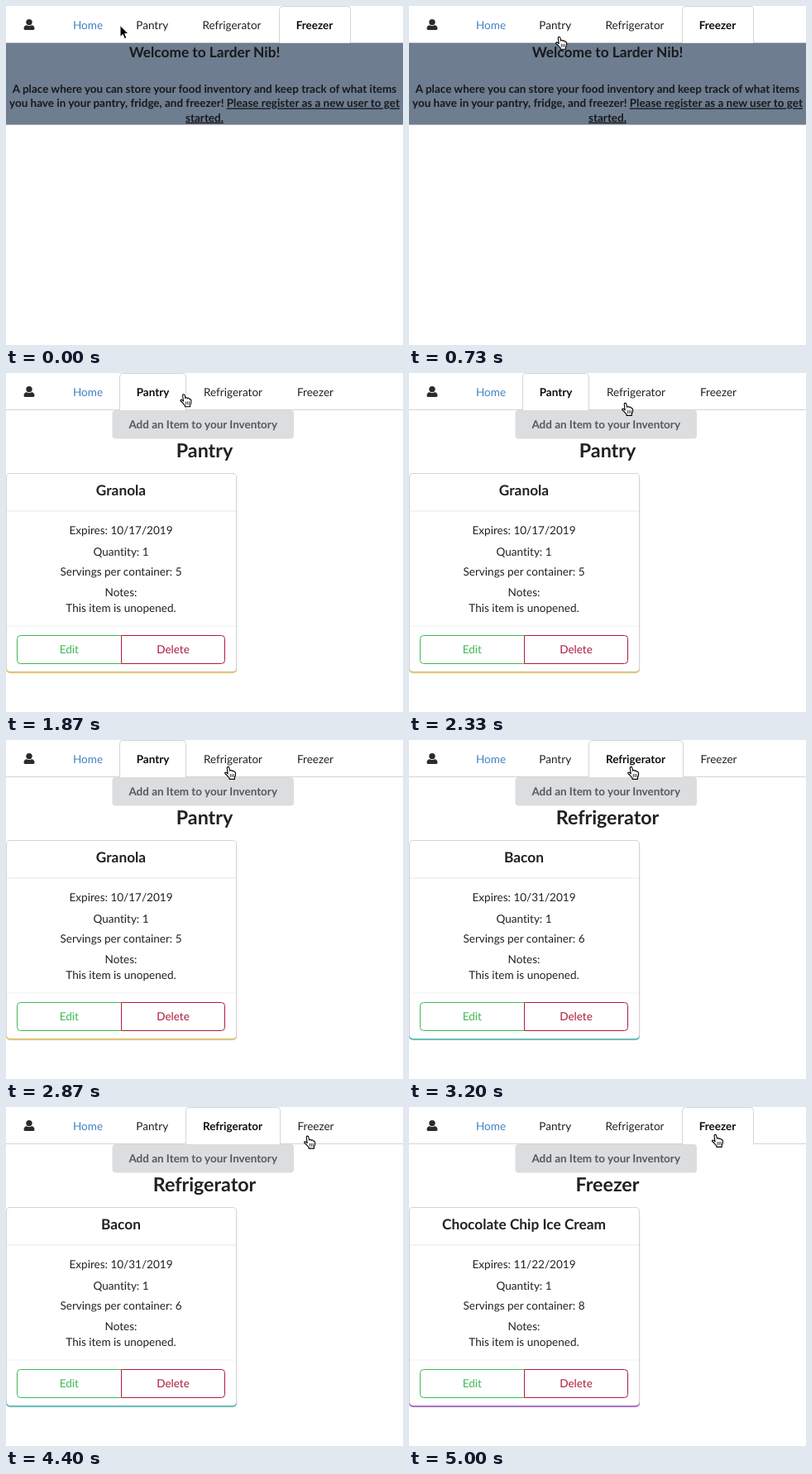
An HTML page for the animation above (5390 ms loop, 480 by 410 pixels).

```html
<!DOCTYPE html>
<html lang="en">
<head>
<meta charset="utf-8">
<title>Food inventory</title>
<style>
  html, body { margin: 0; width: 100%; height: 100%; overflow: hidden; background: #fff; }
  svg { display: block; }
  text {
    font: 13.55px Lato, sans-serif; fill: #212121; text-anchor: middle;
    text-rendering: geometricPrecision; font-variant-ligatures: none;
  }
  .bold { font-size: 13.47px; font-weight: 700; }
  .title { font-size: 17.3px; font-weight: 700; }
  .heading { font-size: 23.25px; font-weight: 700; }
  .link { text-decoration: underline; }
  .home { fill: #4183c4; }
  .active { fill: #0d0d0d; }
  .intro text { fill: #17191b; }
  .add { fill: #58595a; }
  .edit { fill: #3dbb52; }
  .delete { fill: #ae1a3c; }
</style>
</head>
<body>
<svg id="stage" width="480" height="410" viewBox="0 0 480 410">
  <g id="page"></g>
  <path id="arrow" d="M0 0V13.9L3.2 11L5.4 16.1L7.9 15L5.7 10H10Z"
        fill="#000" stroke="#fff" stroke-width="1" stroke-linejoin="round"/>
  <g id="hand" stroke="#000" stroke-linejoin="round" stroke-linecap="round">
    <path transform="translate(-4.6 -.8)" fill="#fff" stroke-width="1.1"
          d="M4.1 9L3.2 2.2Q3 .6 4.3 .5Q5.5 .4 5.8 2L6.6 5.4Q7 4.4 8 4.6Q9 4.7 9.1 5.8
             Q9.6 5 10.5 5.3Q11.4 5.6 11.5 6.6Q12.4 6.2 13 7Q13.7 7.8 13.5 10Q13.4 12 12.3 13.3
             V15.5H6V14Q4.6 12.6 3.4 11.2Q2 9.6 .9 8.8Q.2 8 1 7.3Q1.9 6.8 2.9 7.7Z"/>
    <path transform="translate(-4.6 -.8)" fill="none" stroke-width=".8"
          d="M7.2 9.6V12.6M9.2 9.6V12.6M11.2 9.6V12.6"/>
  </g>
</svg>
<script>
const LOOP = 5390;
const STEP = 1000 / 15;
const GREY = '#d4d4d5';
const byId = id => document.getElementById(id);

const text = (x, y, str, cls = '') => `<text x="${x}" y="${y}" class="${cls}">${str}</text>`;
const rect = (x, y, w, h, fill, r = 0) =>
  `<rect x="${x}" y="${y}" width="${w}" height="${h}" rx="${r}" fill="${fill}"/>`;
const path = (d, stroke, fill = 'none') => `<path d="${d}" stroke="${stroke}" fill="${fill}"/>`;

const tabs = [
  { label: 'Pantry', left: 137.5, right: 217.5 },
  { label: 'Refrigerator', left: 217.5, right: 331.5 },
  { label: 'Freezer', left: 330.5, right: 416.5 }
];

function nav(active, centers) {
  const { left, right } = tabs[active];
  const icon = `<g fill="#2a2b2c"><circle cx="28" cy="19.6" r="3.7"/>
    <path d="M21.5 27.6Q21.5 23.4 25.2 23.2Q28 24.9 30.8 23.2Q34.5 23.4 34.5 27.6Q34.5 29 33 29H23Q21.5 29 21.5 27.6Z"/></g>`;
  return path('M0 44.5H480', GREY) +
    path(`M${left} 45V4.5Q${left} .5 ${left + 4} .5H${right - 4}Q${right} .5 ${right} 4.5V45`, GREY, '#fff') +
    icon + text(99, 27.6, 'Home', 'home') +
    tabs.map((t, i) => text(centers[i], 27.6, t.label, i === active ? 'bold active' : '')).join('');
}

function welcome() {
  return `<g class="intro">` + rect(0, 44.8, 480, 98.8, '#6e7d90') +
    text(240, 62.2, 'Welcome to Larder Nib!', 'title') +
    text(240, 105, 'A place where you can store your food inventory and keep track of what items', 'bold') +
    text(240, 122.4, 'you have in your pantry, fridge, and freezer! <tspan class="link">Please register as a new user to get</tspan>', 'bold') +
    text(240, 139.7, 'started.', 'bold link') + '</g>';
}

function card({ name, expires, servings, color }) {
  return rect(-.5, 124, 280, 239.5, '#ececec', 5) +
    rect(0, 124, 279, 238.7, color, 5) +
    rect(0, 121, 279, 240.4, GREY, 5) +
    rect(1, 122, 277, 238.8, '#fff', 4) +
    path('M1 167H278', '#e8e8e8') + path('M1 306H278', '#f0f0f0') +
    text(139, 148.2, name, 'title') +
    text(139, 195.3, `Expires: ${expires}`) +
    text(139, 220.5, 'Quantity: 1') +
    text(139, 245.3, `Servings per container: ${servings}`) +
    text(139, 270.2, 'Notes:') +
    text(139, 288.6, 'This item is unopened.') +
    path('M139 317.5H17.5Q13.5 317.5 13.5 321.5V347.5Q13.5 351.5 17.5 351.5H139', '#3dbb52') +
    path('M139.5 317.5H260.5Q264.5 317.5 264.5 321.5V347.5Q264.5 351.5 260.5 351.5H139.5Z', '#ae1a3c') +
    text(76.3, 339.3, 'Edit', 'edit') + text(202, 339.3, 'Delete', 'delete');
}

function shelf(active, centers, item) {
  return nav(active, centers) +
    rect(128.5, 45, 219.5, 34.5, '#dcddde', 4) +
    text(238.2, 66.8, 'Add an Item to your Inventory', 'bold add') +
    text(240, 102.3, tabs[active].label, 'heading') + card(item);
}

const freezerCenters = [176.7, 273, 373];
const pages = [
  { from: 0, html: nav(2, freezerCenters) + welcome() },
  { from: 16, html: shelf(0, [177.5, 274.5, 374],
    { name: 'Granola', expires: '10/17/2019', servings: 5, color: '#e3b93c' }) },
  { from: 45, html: shelf(1, [176.7, 274, 374.5],
    { name: 'Bacon', expires: '10/31/2019', servings: 6, color: '#2cb3a9' }) },
  { from: 74, html: shelf(2, freezerCenters,
    { name: 'Chocolate Chip Ice Cream', expires: '11/22/2019', servings: 8, color: '#9038b8' }) }
];

// Pointer tip: step, x, y
const route = [
  [0, 138, 23.5], [2, 116, 20], [4, 100, 55], [5, 108, 84], [6, 135, 91], [7, 164, 75],
  [8, 181, 55], [9, 183, 32], [10, 189, 45], [11, 181.7, 37.5],
  [25, 181.7, 37.5], [26, 186, 36], [28, 215, 26], [30, 268, 25], [31, 287, 30],
  [32, 268, 38], [33, 243, 42], [34, 236, 43], [35, 261.7, 36.7], [40, 268.7, 32.7],
  [54, 268.7, 32.7], [55, 273, 33], [58, 295.7, 34.7], [63, 352, 38], [64, 353, 39],
  [67, 370.5, 33.7], [81, 370.5, 33.7]
];

function pointerAt(step) {
  const i = Math.max(1, route.findIndex(p => p[0] >= step));
  const [s0, x0, y0] = route[i - 1], [s1, x1, y1] = route[i];
  const k = (step - s0) / (s1 - s0);
  return [x0 + (x1 - x0) * k, y0 + (y1 - y0) * k];
}

let shown = null;
function draw(now) {
  const step = Math.floor((now % LOOP + 5) / STEP);
  const page = pages.filter(p => p.from <= step).pop();
  if (page !== shown) {
    byId('page').innerHTML = page.html;
    shown = page;
  }
  const [x, y] = pointerAt(step);
  const overTab = step > 0 && y < 44.5;
  for (const [id, on] of [['hand', overTab], ['arrow', !overTab]]) {
    byId(id).setAttribute('transform', `translate(${x} ${y})`);
    byId(id).setAttribute('visibility', on ? 'visible' : 'hidden');
  }
}

function tick() {
  draw(performance.now());
  requestAnimationFrame(tick);
}
tick();
</script>
</body>
</html>
```
